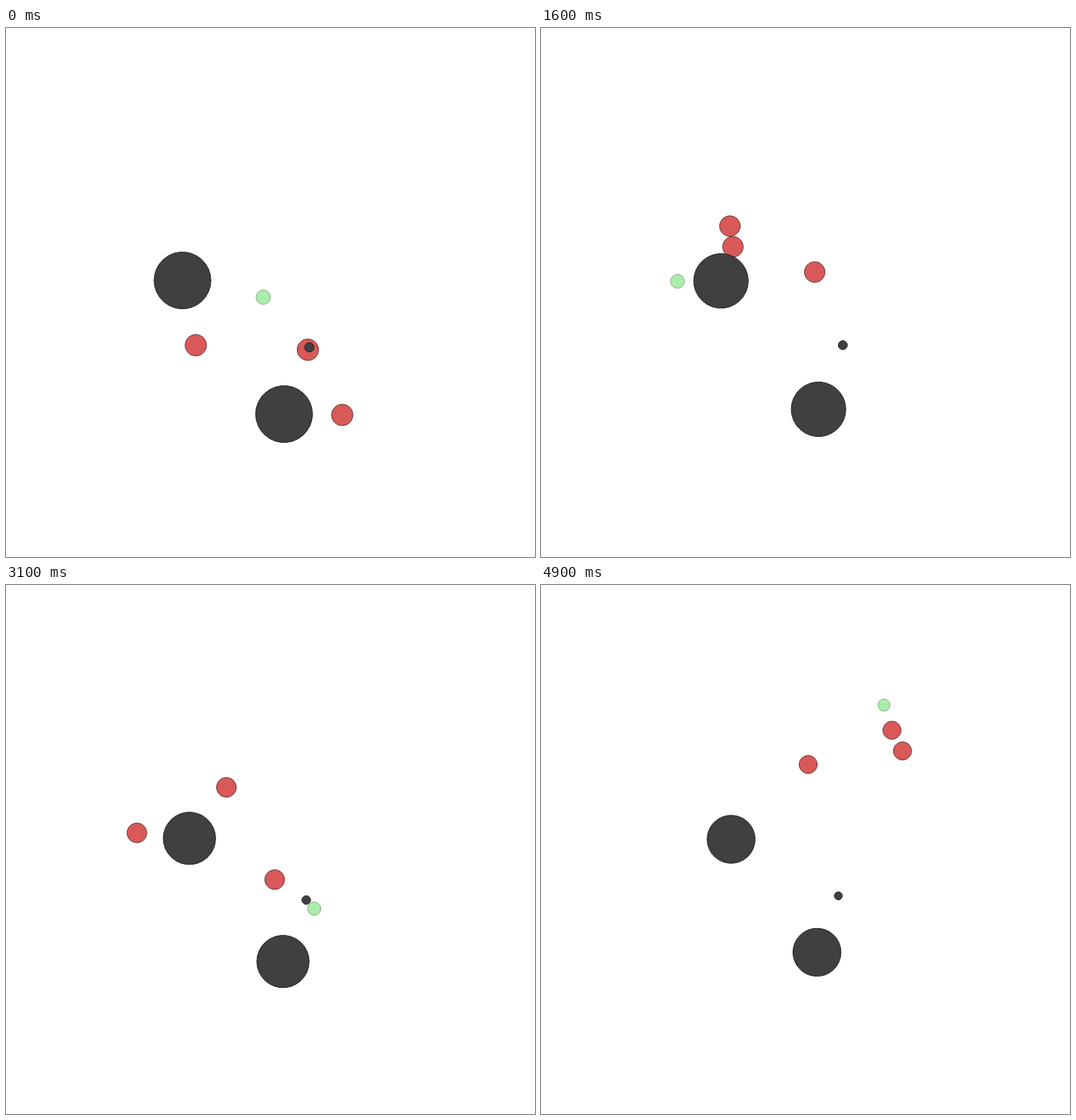
Recreate the animation shown at these times as an HTML page with a canvas. Size 700x700 px, loop 5 s.

```html
<!DOCTYPE html>
<html lang="en">
<head>
<meta charset="utf-8">
<title>Pursuit</title>
<style>
  html, body { margin: 0; width: 100%; height: 100%; overflow: hidden; background: #fff; }
  canvas { display: block; width: 700px; height: 700px; }
</style>
</head>
<body>
<canvas id="stage" width="700" height="700"></canvas>
<script>
const ctx = document.getElementById('stage').getContext('2d');
const STEP = 100, COUNT = 50, HALF = 350, SIDES = 30;

const RED = { r: .075, fill: '#d95959', line: '#6d2d2d' };
const GREEN = { r: .05, fill: 'rgba(89,217,89,.5)', line: 'rgba(45,108,45,.5)' };
const ROCK = { r: .2, fill: '#404040', line: '#202020' };
const PEBBLE = { ...ROCK, r: .033 };

// Each mover passes its turning points at these steps (world units, y up)
const turns = [0, 6, 11, 20, 25, 31, 42, 49];
const movers = [
  { look: RED,
    x: [-.526, -.316, -.284, -.803, -.95, -1.021, -.666, .022],
    y: [-.371, -.085, .281, .52, .38, .127, .637, .708] },
  { look: RED,
    x: [.263, .189, -.149, -.731, -.69, -.337, .576, .72],
    y: [-.403, .017, .244, .36, .385, .475, .369, .993] },
  { look: RED,
    x: [.505, .577, .489, -.234, -.26, .032, .764, .808],
    y: [-.862, -.441, -.016, .16, .09, -.23, .124, .821] },
  { look: GREEN,
    x: [-.051, -.16, -.59, -.966, -.47, .334, .934, .654],
    y: [-.033, .518, .512, -.277, -.42, -.452, .556, 1.203] }
];
const fixed = [
  { x: -.6195, y: .085, look: ROCK },
  { x: .0955, y: -.856, look: ROCK },
  { x: .2735, y: -.386, look: PEBBLE }
];

const gap = i => turns[i + 1] - turns[i];

// Speed at a turn: at rest first, then weighted by the gaps on both sides
function speed(v, i) {
  const rate = j => (v[j + 1] - v[j]) / gap(j);
  if (i === 0) return 0;
  if (i === turns.length - 1) return rate(i - 1);
  return (rate(i - 1) * gap(i) + rate(i) * gap(i - 1)) / (gap(i - 1) + gap(i));
}

function along(v, step) {
  let i = 0;
  while (i < turns.length - 2 && turns[i + 1] <= step) i++;
  const u = (step - turns[i]) / gap(i);
  const ease = u * u * (3 - 2 * u);
  const bend = u * (1 - u) * ((1 - u) * speed(v, i) - u * speed(v, i + 1));
  return v[i] + (v[i + 1] - v[i]) * ease + gap(i) * bend;
}

// The view only ever widens: one unit beyond the farthest body so far
let range = 0;
const scenes = Array.from({ length: COUNT }, (_, step) => {
  const moved = movers.map(({ x, y, look }) => ({ x: along(x, step), y: along(y, step), look }));
  const bodies = [...moved, ...fixed];
  for (const { x, y } of bodies) range = Math.max(range, 1 + Math.abs(x), 1 + Math.abs(y));
  return { bodies, scale: HALF / range };
});

function disc({ x, y, look }, scale) {
  ctx.beginPath();
  for (let i = 0; i < SIDES; i++) {
    const a = 2 * Math.PI * i / SIDES;
    ctx.lineTo(HALF + scale * (x + look.r * Math.cos(a)),
               HALF - scale * (y + look.r * Math.sin(a)));
  }
  ctx.closePath();
  ctx.fillStyle = look.fill;
  ctx.strokeStyle = look.line;
  ctx.fill();
  ctx.stroke();
}

function draw() {
  const step = Math.floor((performance.now() - start) / STEP) % COUNT;
  const { bodies, scale } = scenes[step];
  ctx.fillStyle = '#fff';
  ctx.fillRect(0, 0, 2 * HALF, 2 * HALF);
  for (const body of bodies) disc(body, scale);
  requestAnimationFrame(draw);
}

const start = performance.now();
draw();
</script>
</body>
</html>
```
